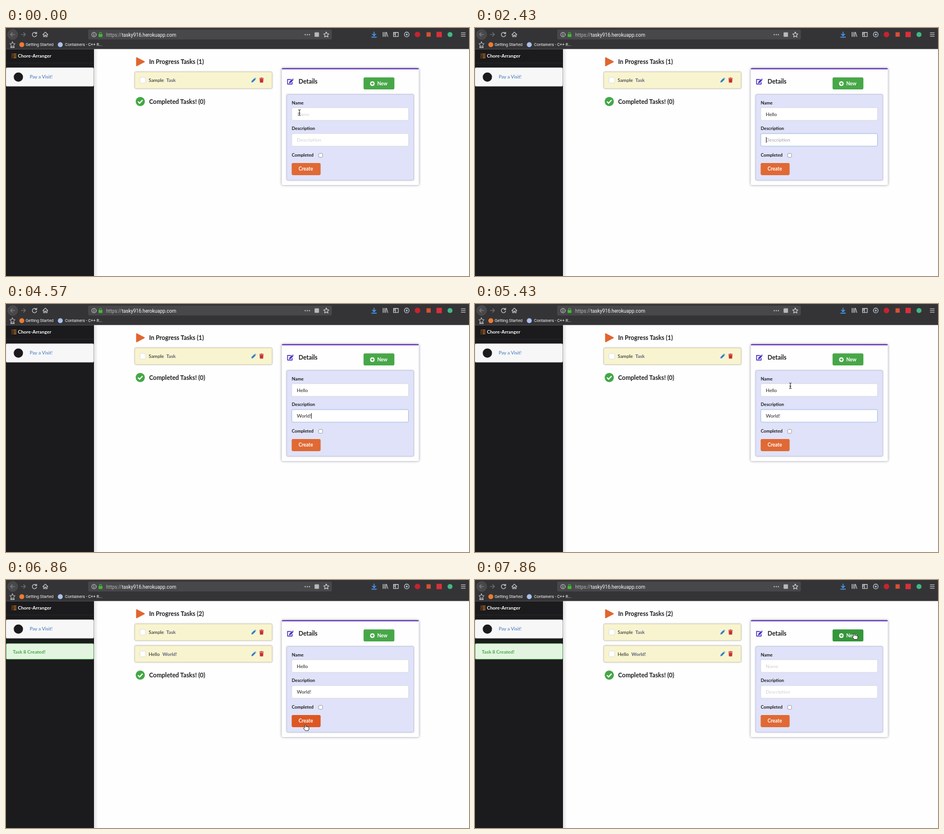
These frames come from a looping animation (800x428 px, 8 s). An HTML page:

```html
<!DOCTYPE html>
<html lang="en">
<head>
<meta charset="utf-8">
<title>Task list</title>
<style>
html, body { margin: 0; width: 100%; height: 100%; overflow: hidden; background: #fefeff; }
svg { display: block; width: 100vw; height: 100vh; }
text { font: 8.25px Lato, sans-serif; fill: #1c1c1e; }
.b { font-weight: 700; }
.h { font-size: 10.6px; font-weight: 700; }
.lab { font-size: 7.75px; font-weight: 700; }
.btn { font-size: 8.5px; font-weight: 700; fill: #fff; }
.ui { font: 7.15px Roboto, sans-serif; fill: #f4f4f5; }
.url { font: 8.35px Roboto, sans-serif; fill: #b4b4b8; }
.desc { font-weight: 700; fill: #596079; }
.line { fill: none; stroke: #d2d2d5; stroke-width: 1.1; stroke-linecap: round; stroke-linejoin: round; }
.field { fill: #fff; stroke: #d3d5de; stroke-width: .7; }
.shade { filter: drop-shadow(0 .8px 1px rgba(30, 30, 60, .28)); }
</style>
</head>
<body>
<svg viewBox="0 0 800 428" preserveAspectRatio="none">
  <defs>
    <linearGradient id="edge">
      <stop stop-color="#222" stop-opacity=".13"/><stop offset="1" stop-color="#222" stop-opacity="0"/>
    </linearGradient>
    <path id="star" d="M0-4.6L1.4-1.6 4.6-1.2 2.2 1 2.9 4.2 0 2.6-2.9 4.2-2.2 1-4.6-1.2-1.4-1.6z"/>
    <path id="pencil" d="M-4 4L-3.5 1.3 1.3-3.5 3.5-1.3-1.3 3.5zM1.9-4.1Q2.6-4.5 3.2-4L4-3.2Q4.5-2.6 4.1-1.9z"/>
    <g id="card">
      <rect class="shade" x="222.5" y="75.8" width="237.3" height="28.6" rx="2" fill="#f8f4d0" stroke="#cfc99f" stroke-width=".7"/>
      <rect class="field" x="231.4" y="85.2" width="9.8" height="9.8" rx="1.8"/>
      <use href="#pencil" x="428" y="90" fill="#2f7fca"/>
      <path d="M437.8 86.2h2.2l.5-.8h2l.5.8h2.2v1.2h-7.4zM438.3 88h6.4l-.5 6.3h-5.4z" fill="#c92f2f"/>
    </g>
  </defs>

  <!-- page -->
  <rect width="800" height="428" fill="#fefeff"/>
  <rect x="152" y="36" width="7" height="392" fill="url(#edge)"/>

  <!-- browser -->
  <rect width="800" height="36.3" fill="#343437"/>
  <rect x="142" y="2.7" width="421" height="17" rx="2" fill="#48484b"/>
  <circle cx="11.5" cy="11.2" r="8.6" fill="#48484b" stroke="#59595c" stroke-width=".6"/>
  <g class="line">
    <path d="M15 11.2H8M11 8L7.8 11.2 11 14.4" stroke="#85858a"/>
    <path d="M26.5 11.2h7M30.5 8l3.2 3.2-3.2 3.2" stroke="#77777b"/>
    <path d="M52.4 9.2A3.8 3.8 0 1 0 53 12.2M53 7v2.8h-2.8"/>
    <path d="M63.7 11.3L68 7.2l4.3 4.1M65 11v4h2v-2.6h2V15h2v-4"/>
    <circle cx="152" cy="11.4" r="3.8" stroke-width=".9"/>
    <path d="M152 11v2.3M152 9.3v.1"/>
    <path d="M161.4 10.8V9.4a1.9 1.9 0 0 1 3.8 0v1.4" stroke="#45b936"/>
    <use href="#star" x="553.4" y="11.4"/>
    <path d="M636 7v6.2M633.2 10.6l2.8 2.8 2.8-2.8M632 15.8h8" stroke="#4a9df5" stroke-width="1.4"/>
    <path d="M651.5 7.4v7.4M654 7.4v7.4M656.3 7.4v7.4M657.6 7.6l2.2 7.2"/>
    <path d="M669.6 7.6h8.2v7.2h-8.2zM673 7.6v7.2M670.8 9.5h1M670.8 11.2h1"/>
    <circle cx="692.4" cy="11.2" r="4.1"/>
    <path d="M786.6 8.2h7M786.6 11.2h7M786.6 14.2h7"/>
    <use href="#star" x="11.2" y="28.4" stroke-width=".9"/>
    <path d="M8 33.6h6.4"/>
  </g>
  <circle cx="692.4" cy="11.2" r="1.7" fill="#8fb4d4"/>
  <rect x="160" y="10.6" width="6.6" height="4.8" rx=".8" fill="#45b936"/>
  <g fill="#d2d2d5"><circle cx="517" cy="11.4" r="1"/><circle cx="520.6" cy="11.4" r="1"/><circle cx="524.2" cy="11.4" r="1"/></g>
  <rect x="533.2" y="7.6" width="7.6" height="7.6" rx="1" fill="#b9b9bd"/>
  <circle cx="711" cy="11.2" r="4.8" fill="#c5242f"/>
  <rect x="726.6" y="7.4" width="7.2" height="7.6" fill="#d95032"/>
  <rect x="743.8" y="6.6" width="9.2" height="9.2" fill="#d9303a"/>
  <circle cx="767.2" cy="11.2" r="4.3" fill="#41b883"/>
  <text class="url" x="173" y="14.6">https://<tspan fill="#fafafa">tasky916.herokuapp.com</tspan></text>
  <circle cx="27.3" cy="28.8" r="4.3" fill="#ee7b30"/>
  <text class="ui" x="34" y="31.3">Getting Started</text>
  <circle cx="93.8" cy="28.8" r="4.3" fill="#a9c1ee"/>
  <text class="ui" x="102" y="31.3">Containers - C++ R...</text>

  <!-- sidebar -->
  <rect y="36.3" width="152" height="391.7" fill="#1b1a1c"/>
  <path d="M0 60.3h152" stroke="#2c2b2e" stroke-width=".8"/>
  <path d="M13 45.2h5M13 48.3h5M13 51.4h5" stroke="#ef8a2c" stroke-width="1.3"/>
  <path d="M9.6 45l.9.9 1.5-1.7M9.6 48.1l.9.9 1.5-1.7M9.8 51.4h1.6" fill="none" stroke="#ef8a2c"/>
  <text class="b" x="20.5" y="51.3" fill="#fff" style="fill:#fff">Chore-Arranger</text>
  <rect x="0" y="68.6" width="151.6" height="32" rx="2" fill="#f7f7f8" stroke="#cfcfd2" stroke-width=".7"/>
  <circle cx="21.4" cy="84.7" r="8" fill="#1b1a1c"/>
  <text x="41" y="87" style="fill:#3472b4">Pay a Visit!</text>
  <g id="note">
    <rect x=".3" y="109.7" width="151.3" height="27" rx="2" fill="#e3f5e1" stroke="#58b958" stroke-width=".8"/>
    <text class="b" x="11.8" y="126.6" style="fill:#3faa40">Task 8 Created!</text>
  </g>

  <!-- task lists -->
  <path d="M225.6 51.2L239 58.2 225.6 65.2z" fill="#e0662f" stroke="#e0662f" stroke-width="1.6" stroke-linejoin="round"/>
  <text class="h" id="count" x="247.2" y="62"></text>
  <use href="#card"/>
  <text x="246.6" y="93">Sample</text><text class="desc" x="277" y="93">Task</text>
  <g id="added">
    <use href="#card" y="37.4"/>
    <text x="246.6" y="130.6">Hello</text><text class="desc" x="270.3" y="130.6">World!</text>
  </g>
  <g id="done">
    <circle cx="232" cy="126.8" r="7.9" fill="#43a746"/>
    <path d="M228 127l2.8 2.8 5.2-5.4" fill="none" stroke="#fff" stroke-width="2"/>
    <text class="h" x="247.2" y="130.7">Completed Tasks! (0)</text>
  </g>

  <!-- details -->
  <rect x="476.4" y="69.6" width="237" height="201.4" rx="2" fill="#fefeff" style="filter:drop-shadow(0 .8px 2px rgba(20,20,40,.45))"/>
  <path d="M476.4 71.2q0-2 2-2h233q2 0 2 2z" fill="#5c2fb0"/>
  <path d="M492.5 88.8h-6v8h8v-3.6" fill="none" stroke="#4c30c4" stroke-width="1.4" stroke-linejoin="round"/>
  <use href="#pencil" x="493" y="91.4" fill="#4c30c4"/>
  <text class="h" x="505.4" y="96">Details</text>
  <rect id="newBtn" x="617.8" y="85.2" width="53.3" height="20.9" rx="2.3"/>
  <circle cx="633" cy="96" r="3.9" fill="#fff"/>
  <path d="M630.8 96h4.4M633 93.8v4.4" stroke="#47a748" stroke-width="1.3"/>
  <text class="btn" x="641.4" y="99">New</text>
  <rect class="shade" x="485" y="114.7" width="219.5" height="148" rx="2" fill="#dfe2f8" stroke="#bfc4e0" stroke-width=".8"/>
  <text class="lab" x="493.7" y="131.8">Name</text>
  <text class="lab" x="493.7" y="176.4">Description</text>
  <text class="lab" x="493.7" y="221.5">Completed</text>
  <rect class="field" id="nameBox" x="493.8" y="137.6" width="201.6" height="21.7" rx="2.2"/>
  <rect class="field" id="descBox" x="493.8" y="182.2" width="201.6" height="21.7" rx="2.2"/>
  <text id="name" x="502.6" y="151.6"></text>
  <text id="desc" x="502.6" y="196.2"></text>
  <rect id="caret" width=".8" height="10"/>
  <rect x="540.3" y="216.5" width="6.6" height="6.6" rx="1.4" fill="#fff" stroke="#8e8e96" stroke-width=".8"/>
  <rect id="createBtn" x="493.6" y="233" width="50" height="20.9" rx="2.3"/>
  <text class="btn" x="505.4" y="246.4">Create</text>

  <!-- pointers, hotspot at 0,0 -->
  <g id="pointer">
    <g id="beam" fill="none" stroke-linecap="round">
      <path id="ibar" d="M-1.8-5Q0-5 0-3.8V3.8Q0 5-1.8 5M1.8-5Q0-5 0-3.8M0 3.8Q0 5 1.8 5M-1.2.9h2.4" stroke="#fff" stroke-width="2"/>
      <use href="#ibar" style="stroke:#111"/>
      <path d="M-1.8-5Q0-5 0-3.8V3.8Q0 5-1.8 5M1.8-5Q0-5 0-3.8M0 3.8Q0 5 1.8 5M-1.2.9h2.4" stroke="#111" stroke-width=".9"/>
    </g>
    <path id="arrow" d="M0 0V9L2.1 7.1 3.5 10.3 4.9 9.7 3.5 6.6H6.4z" fill="#111" stroke="#fff" stroke-width=".7"/>
    <path id="hand" transform="translate(1.8 5)" d="M-2.6-.2V-4.2a1 1 0 0 1 2 0v2.6a1 1 0 0 1 1.9.2 1 1 0 0 1 1.8.4 .9.9 0 0 1 1.6.6V2.2L3.6 5H-1.6L-4.6 1.2a.9.9 0 0 1 1.4-1z" fill="#fff" stroke="#111" stroke-width=".8" stroke-linejoin="round"/>
  </g>
</svg>
<script>
const LOOP = 8000, FRAME = 1000 / 7;
const $ = id => document.getElementById(id);
const show = (id, on) => { $(id).style.display = on ? '' : 'none'; };

// key times of each typed letter
const NAME_KEYS = [1290, 1430, 1570, 1640, 1710];
const DESC_KEYS = [3570, 3710, 4000, 4140, 4290, 4570];
const FOCUS_NAME = 430, FOCUS_DESC = 2430, BLUR = 6140, CREATED = 6570, CLEARED = 7855;

// pointer path: time, x, y
const PATH = [[0, 507, 146], [5000, 507, 146], [5430, 545, 141], [5714, 552, 190],
  [5857, 530, 236], [6000, 517, 250], [6860, 517, 250], [7140, 562, 199],
  [7430, 640, 108], [7570, 655, 92.5], [8000, 655, 92.5]];

function pointerAt(t) {
  const i = Math.max(1, PATH.findIndex(p => p[0] > t));
  const [t0, x0, y0] = PATH[i - 1], [t1, x1, y1] = PATH[i];
  const k = (t - t0) / (t1 - t0);
  return [x0 + (x1 - x0) * k, y0 + (y1 - y0) * k];
}

function over(id, x, y) {
  const r = $(id), v = a => +r.getAttribute(a);
  return x >= v('x') && x <= v('x') + v('width') && y >= v('y') && y <= v('y') + v('height');
}

function drawField(id, word, keys, hint, t, focused) {
  const typed = t < CLEARED ? word.slice(0, keys.filter(k => k <= t).length) : '';
  const el = $(id);
  el.textContent = typed || hint;
  el.style.fill = typed ? '#1c1c1e' : focused ? '#a2a2a6' : '#d0d0d5';
  $(id + 'Box').style.stroke = focused ? '#86a8d8' : '';
  if (focused) {
    const width = typed ? el.getComputedTextLength() : 0;
    $('caret').setAttribute('x', 502.8 + width);
    $('caret').setAttribute('y', +el.getAttribute('y') - 8);
  }
}

function draw(now) {
  const t = now % LOOP;
  const inName = t >= FOCUS_NAME && t < FOCUS_DESC;
  const inDesc = t >= FOCUS_DESC && t < BLUR;
  drawField('name', 'Hello', NAME_KEYS, 'Name', t, inName);
  drawField('desc', 'World!', DESC_KEYS, 'Description', t, inDesc);

  const lastKey = Math.max(...[FOCUS_NAME, FOCUS_DESC, ...NAME_KEYS, ...DESC_KEYS].filter(k => k <= t));
  show('caret', (inName || inDesc) && (t - lastKey) % 1134 < 567);

  const created = t >= CREATED;
  show('note', created);
  show('added', created);
  $('count').textContent = `In Progress Tasks (${created ? 2 : 1})`;
  $('done').setAttribute('transform', `translate(0 ${created ? 37.4 : 0})`);

  const [x, y] = pointerAt(Math.floor((t + 5) / FRAME) * FRAME);
  const onNew = over('newBtn', x, y), onCreate = over('createBtn', x, y);
  const onText = over('nameBox', x, y) || over('descBox', x, y);
  $('newBtn').style.fill = onNew ? '#35963a' : '#47a748';
  $('createBtn').style.fill = onCreate ? '#dd5722' : '#e06934';
  $('pointer').setAttribute('transform', `translate(${x} ${y})`);
  show('pointer', t < NAME_KEYS[0] || t >= 5000);
  show('hand', onNew || onCreate);
  show('beam', onText);
  show('arrow', !onNew && !onCreate && !onText);
  requestAnimationFrame(() => draw(performance.now() - start));
}

const start = performance.now();
draw(0);
</script>
</body>
</html>
```
